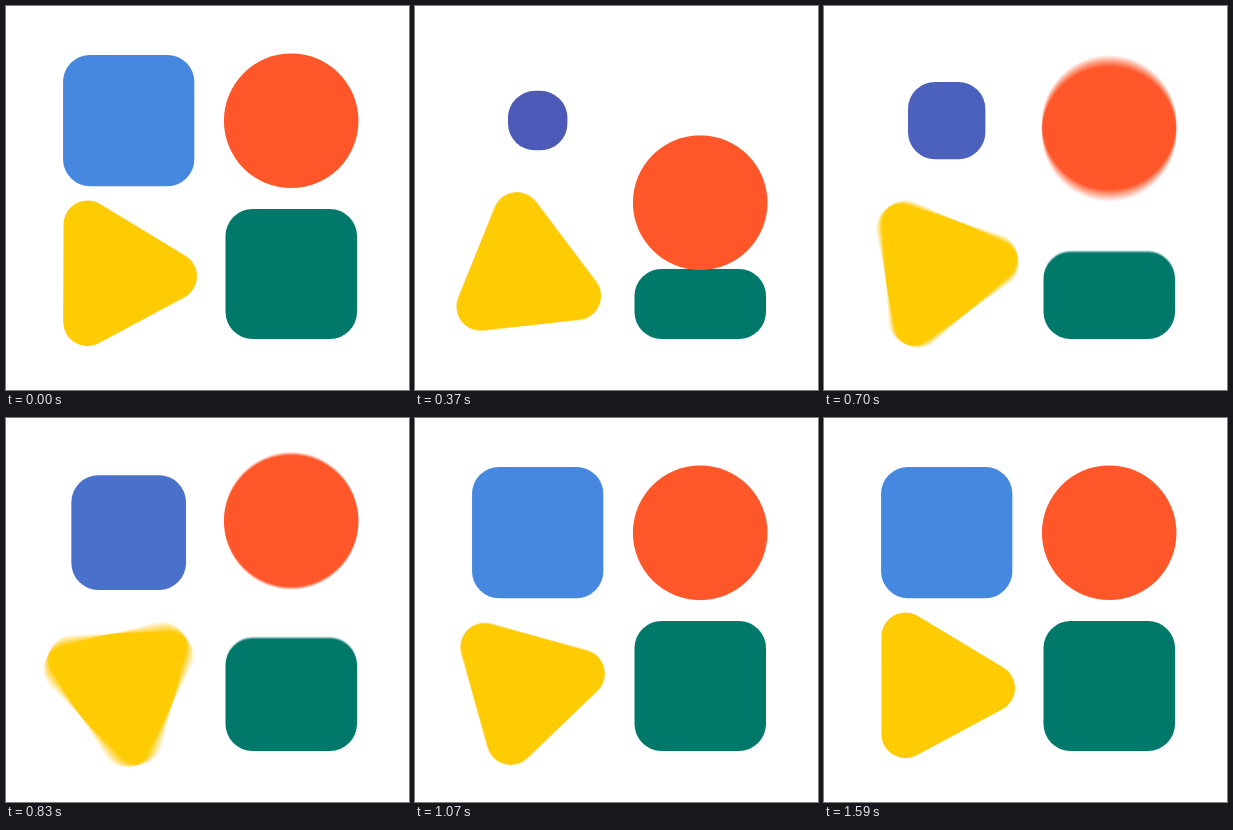
Animation, 403 px wide and 384 px high, one loop 1.62 s. Source, as an HTML page with a canvas:

```html
<!DOCTYPE html>
<html lang="en">
<head>
<meta charset="utf-8">
<title>Shapes</title>
<style>
  html, body { margin: 0; width: 100%; height: 100%; overflow: hidden; background: #fff; }
  canvas { display: block; width: 403px; height: 384px; }
</style>
</head>
<body>
<canvas id="stage" width="403" height="384"></canvas>
<script>
const LOOP = 1620, W = 403, H = 384;
const SHUTTER = 16, SAMPLES = 12;
const CONTACT = 180, LAUNCH = 620, SPIN_PEAK = 880;

const mix = (a, b, k) => a + (b - a) * k;

// Eased progress from 0 to 1 between two times.
function ease(t, from, to) {
  const u = Math.min(1, Math.max(0, (t - from) / (to - from)));
  return u * u * (3 - 2 * u);
}

// Rises over one time span and falls back over a later one.
const pulse = (t, a, b, c, d) => ease(t, a, b) - ease(t, c, d);

const size = t => mix(131.3, 45.5, pulse(t, 105, 461, 524, 950));
const tint = t => pulse(t, 0, 360, 555, 1092);

// Sinks onto the pad, then springs up and settles.
function ballY(t) {
  const rest = 114.8, drop = 81.9;
  if (t < LAUNCH) return rest + drop * ease(t, 85, 370);
  const s = t - LAUNCH;
  return rest + drop * Math.exp(-.0085 * s) * Math.cos(Math.PI * s / 180);
}

// Gives way quickly at contact and recovers slowly.
function padTop(t) {
  const squash = 1 - Math.exp(-Math.max(0, t - CONTACT) / 40);
  return 203 + 60.5 * squash * (1 - ease(t, 540, 985));
}

// One full turn: speeds up exponentially, then glides to a stop.
function spin(t) {
  const windUp = s => 5.33 * Math.expm1(.0044 * Math.max(0, s));
  if (t < SPIN_PEAK) return windUp(t);
  return 360 - (360 - windUp(SPIN_PEAK)) * Math.exp(-.0102 * (t - SPIN_PEAK));
}

const view = document.getElementById('stage').getContext('2d');
const layer = document.createElement('canvas');
layer.width = W;
layer.height = H;
const ctx = layer.getContext('2d');

function box(c, x, y, w, h, color) {
  c.fillStyle = color;
  c.beginPath();
  c.roundRect(x, y, w, h, Math.min(27, w / 2, h / 2));
  c.fill();
}

function triangle(angle) {
  ctx.save();
  ctx.translate(113.3, 267.3);
  ctx.rotate(angle * Math.PI / 180);
  ctx.beginPath();
  ctx.moveTo(-31.8, -48.8);
  ctx.lineTo(53.7, 2.9);
  ctx.lineTo(-32, 48.7);
  ctx.closePath();
  ctx.fillStyle = ctx.strokeStyle = '#ffcb02';
  ctx.lineWidth = 48;
  ctx.lineJoin = 'round';
  ctx.fill();
  ctx.stroke();
  ctx.restore();
}

function scene(t) {
  ctx.fillStyle = '#fff';
  ctx.fillRect(0, 0, W, H);
  triangle(spin(t));
  const top = padTop(t);
  box(ctx, 219.5, top, 131.5, 333 - top, '#00796b');
  ctx.fillStyle = '#ff5729';
  ctx.beginPath();
  ctx.arc(285.2, ballY(t), 67.3, 0, 2 * Math.PI);
  ctx.fill();
}

function blueBox(t) {
  const s = size(t), k = tint(t);
  const rgb = [mix(70, 77, k), mix(136, 89, k), mix(223, 182, k)].map(Math.round);
  box(view, 122.7 - s / 2, 114.6 - s / 2, s, s, `rgb(${rgb})`);
}

// Steps of 30 ms, with one longer hold in every 490 ms.
function snap(t) {
  const u = (t + 210) % 490;
  return t - u + 30 * Math.min(14, Math.floor(u / 30));
}

function draw(t) {
  // Average several moments for motion blur.
  for (let i = 0; i < SAMPLES; i++) {
    scene(t + SHUTTER * ((i + .5) / SAMPLES - .5));
    view.globalAlpha = 1 / (i + 1);
    view.drawImage(layer, 0, 0);
  }
  view.globalAlpha = 1;
  blueBox(t);
}

const start = performance.now();
let shown = -1;
function tick() {
  const t = snap((performance.now() - start) % LOOP);
  if (t !== shown) draw(shown = t);
  requestAnimationFrame(tick);
}
tick();
</script>
</body>
</html>
```
